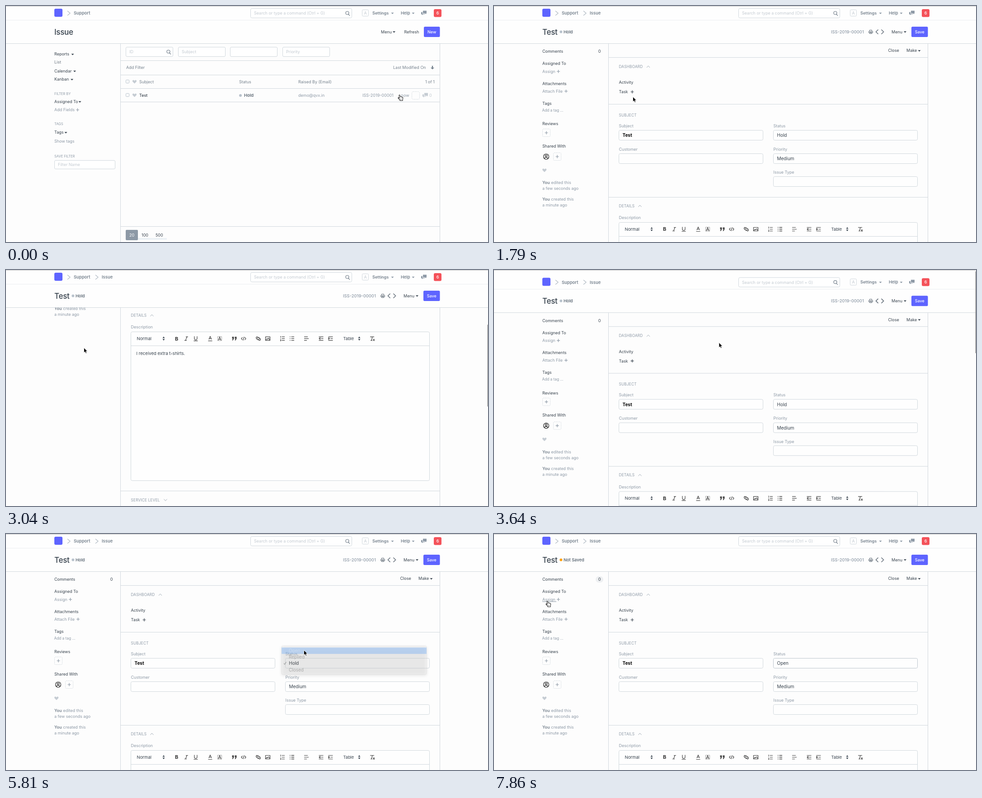
An HTML page with a canvas for the animation above (8000 ms loop, 1067x525 px).

```html
<!DOCTYPE html>
<html lang="en">
<head>
<meta charset="utf-8">
<title>Issue status</title>
<style>
html, body { margin: 0; width: 100%; height: 100%; overflow: hidden; background: #fdfdfd; }
canvas { display: block; }
</style>
</head>
<body>
<canvas width="1067" height="525"></canvas>
<script>
const W = 1067, H = 525, LOOP = 8000;
const c = document.querySelector('canvas').getContext('2d');
const DARK = '#36414c', MUTED = '#8d99a6', PALE = '#c3cad1', LINE = '#d1d8dd', BLUE = '#5e64ff', BG = '#fdfdfd';

// [first change, last change, number of changes]
const bursts = [[0, 0, 1], [150, 1190, 8], [1640, 1790, 2], [2240, 3190, 7], [3340, 3640, 3],
  [3810, 4140, 3], [4460, 4910, 4], [5810, 5950, 2], [6250, 7270, 8], [7410, 7860, 4]];
const cursorPath = [[0, 871, 198], [450, 720, 182], [750, 480, 175], [1190, 302, 206], [1640, 302, 206],
  [1790, 307.5, 202], [2150, 307.5, 202], [2557, 180, 172], [3032, 172.5, 173], [3190, 190, 172],
  [3640, 498, 161.5], [4140, 645, 288], [4460, 645.5, 291], [4910, 659.5, 258.5], [6150, 659.5, 258.5],
  [6396, 680, 240], [6833, 330, 62], [7124, 200, 100], [7270, 96, 142], [7410, 94, 148], [7560, 104, 150], [7860, 118, 149.5]];
const scrollPath = [[2300, 0], [2557, 60], [2715, 190], [2873, 300], [3032, 344], [3190, 344],
  [3340, 260], [3490, 60], [3640, -11.3], [3810, -3], [3980, 0]];

function snap(t) {
  const [a, b, n] = bursts.filter(s => s[0] <= t).pop();
  if (t >= b) return b;
  const gap = (b - a) / (n - 1);
  return a + Math.floor((t - a) / gap + 1e-6) * gap;
}

function along(keys, t) {
  const i = keys.findIndex(k => k[0] > t);
  if (i < 0) return keys[keys.length - 1].slice(1);
  if (i === 0) return keys[0].slice(1);
  const a = keys[i - 1], b = keys[i], p = (t - a[0]) / (b[0] - a[0]);
  return a.slice(1).map((v, k) => v + (b[k + 1] - v) * p);
}

// y is the middle of the capitals
function text(s, x, y, color = DARK, size = 9, weight = 400, o = {}) {
  c.font = `${o.italic ? 'italic ' : ''}${weight} ${size}px Inter, sans-serif`;
  c.letterSpacing = (o.gap || 0) + 'px';
  c.textAlign = o.align || 'left';
  c.fillStyle = color;
  c.fillText(s, x, y + size * .36);
}
function caps(s, x, y, size = 8.25) { text(s, x, y, MUTED, size, 400, { gap: size > 8 ? .2 : 0 }); }
function path(d, x, y, stroke, fill, width = 1) {
  const p = new Path2D(d);
  c.save();
  c.translate(x, y);
  c.lineWidth = width;
  c.lineJoin = 'round';
  if (fill) { c.fillStyle = fill; c.fill(p); }
  if (stroke) { c.strokeStyle = stroke; c.stroke(p); }
  c.restore();
}
function box(x, y, w, h, r, stroke, fill, dash = []) {
  c.beginPath();
  c.roundRect(x, y, w, h, r);
  c.lineWidth = 1;
  c.setLineDash(dash);
  if (fill) { c.fillStyle = fill; c.fill(); }
  if (stroke) { c.strokeStyle = stroke; c.stroke(); }
  c.setLineDash([]);
}
function dot(x, y, r, color) {
  c.beginPath();
  c.arc(x, y, r, 0, 7);
  c.fillStyle = color;
  c.fill();
}
function rect(x, y, w, h, color) { c.fillStyle = color; c.fillRect(x, y, w, h); }
function rule(y, x = 254, w = 706, color = LINE) { rect(x, y, w, 1, color); }
function input(x, y, w, h, hint) {
  box(x + .5, y + .5, w, h, 2.5, LINE, '#fff');
  if (hint) text(hint, x + 8, y + h / 2 + .5, PALE);
}
const caret = (x, y, color = DARK) => path('M-3-1.3H3L0 1.9Z', x, y, null, color);
const plus = (x, y, color = MUTED, r = 3.5) => path(`M${-r} 0H${r}M0${-r}V${r}`, x, y, color, null, 1.2);
const chevron = (x, y, color, w = 1.3, s = 1) => path(`M${-3 * s}-5L${3 * s} 0L${-3 * s} 5`, x, y, color, null, w);
const fold = (x, y, s = 1) => path(`M-3.5 ${2 * s}L0 ${-2 * s}L3.5 ${2 * s}`, x, y, '#a5afb9');
const heart = (x, y) => path('M0 4L-4 0C-6-3-2-5.5 0-2C2-5.5 6-3 4 0Z', x, y, null, '#c5ccd3');
const lens = (x, y) => path('M3-1A3.5 3.5 0 1 1-4-1A3.5 3.5 0 1 1 3-1M2 2L5 5', x, y, '#74808c', null, 1.2);
const chat = (x, y, color) => path('M-2-5H6V1H5V3L3 1H-2ZM-6-2H-3V2H2V3H-2L-4 5V3H-6Z', x, y, null, color);
const sorter = (x, y) => path('M-2.5-1L0-4.5L2.5-1ZM-2.5 1L0 4.5L2.5 1Z', x, y, null, DARK);
function button(label, x, w) {
  box(x, 46, w, 23, 2.5, null, BLUE);
  text(label, x + w / 2, 57.5, '#fff', 9, 500, { align: 'center' });
}

function header(form, saved) {
  rect(0, -20, W, 103, '#fefefe');
  box(107, 6, 18, 18, 3, null, BLUE);
  chevron(139, 16, '#b3bcc5');
  text('Support', 150, 16, '#75818d', 9.4, 600);
  box(541.5, 5.5, 224, 21, 3, LINE, '#fff');
  text('Search or type a command (Ctrl + G)', 549, 16, PALE);
  lens(756, 16.5);
  box(788.5, 8.5, 14, 14, 2, LINE);
  text('A', 795.5, 15.7, PALE, 9, 400, { align: 'center' });
  text('Settings', 811, 15.5, '#75818d', 9.1, 600);
  caret(855.5, 16, MUTED);
  text('Help', 874, 15.5, '#75818d', 9.2, 600);
  caret(901.5, 16, MUTED);
  chat(925, 15.5, MUTED);
  box(947, 7, 17, 17.5, 3, null, '#f4525a');
  text('6', 955.5, 15.8, '#fff', 9, 500, { align: 'center' });
  rule(31, 0, W, '#ebeef1');
  rule(83, 0, W);
  text(form ? 'Test' : 'Issue', 107, 57.5, DARK, 17, 500, { gap: -.3 });
  if (!form) {
    text('Menu', 830, 57.5, DARK, 9);
    caret(859, 57.5);
    text('Refresh', 881.5, 57.5);
    button('New', 925, 35.5);
    return;
  }
  chevron(201, 16, '#b3bcc5');
  text('Issue', 212, 16, '#75818d', 9.4, 600);
  dot(148.3, 57.5, 3, saved ? '#b8c2cc' : '#ffa00a');
  text(saved ? 'Hold' : 'Not Saved', 154, 57.5, '#5f6b77', 9.2, 600);
  text('ISS-2019-00001', 746, 57.5, MUTED, 9.4, 500);
  path('M-2.5-1V-4H2.5V-1M-4.5 2V-1H4.5V2ZM-2.5 1H2.5V4H-2.5Z', 834, 57.5, '#6c7680');
  chevron(848, 57.5, '#6c7680', 1.7, -.85);
  chevron(860, 57.5, '#6c7680', 1.7, .85);
  text('Menu', 880, 57.5);
  caret(910, 57.5);
  button('Save', 924, 36.5);
}

function frameSides() {
  rect(253, 84, 1, 900, LINE);
  rect(960, 84, 1, 900, LINE);
}

function listPage(hover) {
  frameSides();
  for (const [s, y, x] of [['Reports', 107, 147.5], ['Calendar', 144.5, 152], ['Kanban', 163, 146],
    ['Assigned To', 212.5, 163.5], ['Tags', 281, 132.5]]) {
    text(s, 107, y);
    caret(x, y + .5);
  }
  text('List', 107, 125, '#6c7680');
  caps('FILTER BY', 107, 195, 7.5);
  text('Add Fields', 107, 230.5, MUTED);
  plus(158.5, 231);
  caps('TAGS', 107, 262.5, 7.5);
  text('Show tags', 107, 301, MUTED);
  caps('SAVE FILTER', 107, 334.5, 7.5);
  input(107, 343, 134, 19, 'Filter Name');

  ['ID', 'Subject', '', 'Priority'].forEach((s, i) => input(Math.round(265 + i * 115.7), 91, 104, 21, s));
  lens(360, 102.5);
  [121, 153, 183, 213, 490].forEach(y => rule(y));
  text('Add Filter', 266, 137, '#75818d');
  text('Last Modified On', 857, 137, '#75818d');
  path('M-1.2-4H1.2V0H4L0 4L-4 0H-1.2Z', 944, 137, null, '#75818d');
  for (const y of [168, 198]) {
    box(265.5, y - 3.5, 7, 7, 1, '#b8c2cc');
    heart(284.5, y + .5);
  }
  text('Subject', 295, 168.5, '#75818d');
  text('Status', 516, 168.5, '#75818d');
  text('Raised By (Email)', 647, 168.5, '#75818d');
  text('1 of 1', 949, 168.5, '#75818d', 9, 400, { align: 'right' });
  text('Test', 295, 198.5, DARK, 9, 500);
  if (hover) rule(203, 295, 18, DARK);
  dot(519, 199, 3, '#b8c2cc');
  text('Hold', 527, 199, '#6c7680', 9.3, 700);
  text('demo@qvx.in', 647, 199, MUTED);
  text('ISS-2019-00001', 789, 198.5, MUTED);
  text('now', 892.5, 198.5, MUTED, 9, 400, { align: 'right' });
  box(898.5, 190.5, 17, 17, 3, LINE, null, [2, 1.5]);
  chat(928, 198.5, '#c5ccd3');
  text('0', 937, 199, PALE);
  rect(292, 516, 64, 4, '#ecf1f5');
  box(265, 498, 27, 23, 2, null, MUTED);
  text('20', 278.5, 509.5, '#fff', 9, 400, { align: 'center' });
  text('100', 300, 509.5);
  text('500', 331, 509.5);
}

function sidebar(t) {
  if (t >= 7124) box(225, 94, 17, 14, 7, null, '#eef0f2');
  text('Comments', 107, 101);
  text('0', 233.7, 101, DARK, 9, 400, { align: 'center' });
  text('Assigned To', 107, 128);
  text('Assign', 107, 145.5, MUTED);
  plus(142.5, 145.5);
  if (t >= 7560) rule(150, 107, 31, MUTED);
  text('Attachments', 107, 172.5);
  text('Attach File', 107, 189.5, MUTED);
  plus(159.5, 189.5);
  text('Tags', 107, 216.5);
  text('Add a tag ...', 106.5, 232, MUTED, 8.25);
  text('Reviews', 107, 262);
  text('Shared With', 107, 311.5);
  for (const [x, y] of [[107.5, 273.5], [131.5, 326.5]]) {
    box(x, y, 17, 17, 2, LINE, null, [2, 1.5]);
    plus(x + 8.5, y + 8.5);
  }
  path('M6 0A6 6 0 1 1-6 0A6 6 0 1 1 6 0M2.2-1.5A2.2 2.2 0 1 1-2.2-1.5A2.2 2.2 0 1 1 2.2-1.5M-4 4C-3 1 3 1 4 4', 115.5, 335, '#222', null, 1.2);
  heart(111.7, 365.5);
  [['edited this', 'a few seconds ago', 393], ['created this', 'a minute ago', 430]].forEach(([what, when, y]) => {
    text('You', 107, y, '#75818d', 9, 600);
    text(what, 126.5, y, MUTED);
    text(when, 107, y + 13, MUTED);
  });
}

function toolbar(y) {
  const ink = (d, x, w = 1.2) => path(d, x, y, '#444', null, w);
  text('Normal', 289.5, y, DARK, 9.5);
  sorter(349, y);
  text('B', 374, y, '#333', 11, 700);
  ink('M-1-4H4M-4 4H1M1.5-4L-1.5 4', 399);
  ink('M-3-5V0C-3 4 3 4 3 0V-5M-4.5 5H4.5', 420);
  ink('M-3 2L0-5L3 2M-2 0H2M-4.5 5H4.5', 452);
  box(468.5, y - 4.5, 9, 9, 0, '#555', null, [1, 1]);
  ink('M-3 4L0-4L3 4M-2 1.5H2', 473);
  path('M-5-4H-1V0L-3 4H-5L-3.5 0H-5ZM1-4H5V0L3 4H1L2.5 0H1Z', 505.5, y, null, '#444');
  ink('M-2.5-3L-5 0L-2.5 3M2.5-3L5 0L2.5 3M1-4L-1 4', 526);
  ink('M0-2L-1.5-3.5C-4-5-6-2-4 0L-1 2.5C1 3 2 1.5 1.5 0M0 2L1.5 3.5C4 5 6 2 4 0L1-2.5C-1-3-2-1.5-1.5 0', 558.5, 1.4);
  ink('M-5-4H5V4H-5ZM-4 3L-1.5 0L0 1.5L2 -1L4.5 3', 579.5);
  ink('M-1.5-4H5M-1.5 0H5M-1.5 4H5M-4-5.5V-2.5M-5-.5H-3.5M-5 2.5H-3.5V5H-5', 612);
  ink('M-1.5-4H5M-1.5 0H5M-1.5 4H5M-5-4H-3.5M-5 0H-3.5M-5 4H-3.5', 633, 1.4);
  ink('M-5-4H3M-5 0H5M-5 4H1', 665);
  ink('M-5-4H5M0 0H5M-5 4H5M-2-2L-4.5 0L-2 2Z', 697.5);
  ink('M-5-4H5M0 0H5M-5 4H5M-4.5-2L-2 0L-4.5 2Z', 718.5);
  text('Table', 746.5, y, DARK, 9.2);
  sorter(782, y);
  ink('M-5-4H4M0-4L-2 4M-4 4H0M1.5 1L5 5M5 1L1.5 5', 811);
}

function formPage(t) {
  const open = t >= 5950;
  frameSides();
  sidebar(t);
  text('Close', 872.5, 99);
  text('Make', 913, 99);
  caret(941.5, 99.5);
  [114, 218, 425, 835].forEach(y => rule(y));
  caps('DASHBOARD', 276.5, 135);
  fold(341.5, 135);
  text('Activity', 276.5, 170);
  text('Task', 276.5, 191);
  plus(306, 191, DARK);
  caps('SUBJECT', 276.5, 243);
  const fields = [['Subject', 276, 266.5, 'Test'], ['Customer', 276, 318.5], ['Status', 618, 266.5, open ? 'Open' : 'Hold'],
    ['Priority', 618, 318.5, 'Medium'], ['Issue Type', 618, 370]];
  for (const [label, x, y, value] of fields) {
    text(label, x + .5, y, MUTED);
    box(x + .5, Math.round(y) + 9.5, 319, 22, 3, open && label === 'Status' ? '#bcc5cd' : LINE, '#fefefe');
    if (value) text(value, x + 8.5, y + 21.3, value === 'Test' ? '#000' : DARK, 10, value === 'Test' ? 700 : 400);
  }
  caps('DETAILS', 276.5, 445);
  fold(323, 445);
  text('Description', 276.5, 471, MUTED);
  box(276.5, 481.5, 661, 331, 3, LINE, '#fefefe');
  rule(512, 277, 660);
  toolbar(496.5);
  text('I received extra t-shirts.', 288.5, 529.5, DARK, 9.6);
  caps('SERVICE LEVEL', 276.5, 855.5);
  fold(353, 855.5, -1);
}

function statusMenu(alpha, pointerY) {
  const active = Math.max(0, Math.min(3, Math.floor((pointerY - 252) / 14.2)));
  c.save();
  c.globalAlpha = alpha;
  c.shadowColor = 'rgba(0,0,0,.35)';
  c.shadowBlur = 7;
  c.shadowOffsetY = 2;
  box(610, 249, 321, 63.5, 3, null, '#eeeeee');
  c.shadowColor = 'transparent';
  box(610, 249, 321, 63.5, 3, '#c9c9c9');
  rect(610, 252.5 + active * 14.2, 321, 14.2, '#4795f7');
  ['Open', 'Replied', 'Hold', 'Closed'].forEach((s, i) => {
    const color = i === active ? '#fff' : '#222';
    text(s, 626, 259.3 + i * 14.2, color, 10);
    if (s === 'Hold') path('M-2.5 0L-.7 2.5L3-3', 617.5, 287.7, color, null, 1.4);
  });
  c.restore();
}

function pointer(x, y, hand) {
  if (hand) {
    path('M-1 1C-1-.6 1-.6 1.3 1L2 4.2C3 3.4 4 3.7 4.3 4.5C5.3 4 6 4.3 6.3 5.2C7.3 5 7.8 5.6 7.6 7L7 10V12.5H1V11L-2.8 7C-3.5 5.8-2 5-1 6.2L0 7Z', x, y, '#222', '#fff', 1.1);
    path('M2.4 8V10.5M4.2 8V10.5', x, y, '#555', null, .7);
  } else path('M0 0V11L2.5 8.7L4.2 12.4L6.1 11.6L4.4 8H7.8Z', x, y, '#fff', '#000', .8);
}

function draw(now) {
  const t = snap(now % LOOP), form = t >= 1640;
  const [x, y] = along(cursorPath, t), [scroll] = along(scrollPath, t);
  const bounce = Math.max(0, -scroll);
  rect(0, 0, W, H, BG);
  c.save();
  c.translate(0, -scroll);
  if (form) formPage(t); else listPage(t >= 1190);
  c.restore();
  c.save();
  c.translate(0, bounce);
  header(form, t < 5950);
  c.restore();
  rule(0, 0, W, '#c4c4c4');
  if (t >= 2390 && t < 4140) rect(1065.7, 3 + Math.max(0, scroll) * .345, 2, 182, '#8a8a8a');
  if (t >= 4460 && t < 5950) statusMenu(t < 5810 ? 1 : .3, y);
  pointer(x, y, t < 1790 || t >= 7560);
  requestAnimationFrame(draw);
}
requestAnimationFrame(draw);
</script>
</body>
</html>
```
